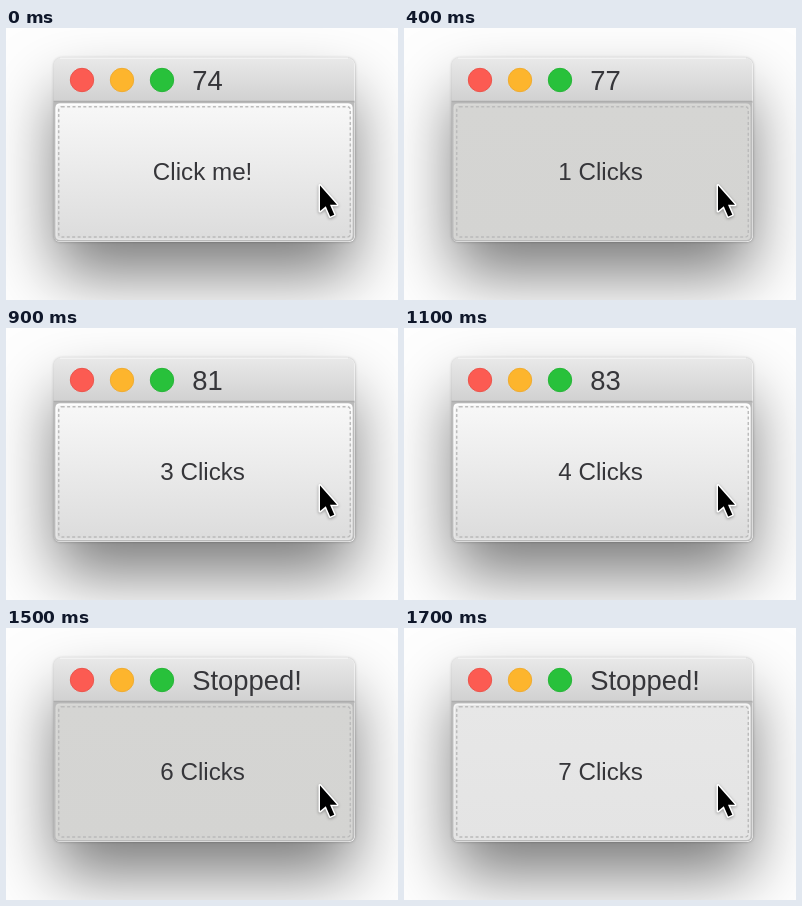
Write an HTML page that moves like this. It is 392 px wide and 272 px high and loops after 1800 ms.

```html
<!DOCTYPE html>
<html lang="en">
<head>
<meta charset="utf-8">
<title>Click counter</title>
<style>
  html, body { margin: 0; width: 392px; height: 272px; overflow: hidden; background: #fefefe; }
  #shadow {
    position: absolute; left: 47.5px; top: 29.5px; width: 301px; height: 184px;
    border-radius: 8px 8px 6px 6px;
    box-shadow: 0 34px 64px -2px rgba(0, 0, 0, .52), 0 0 3px rgba(0, 0, 0, .3);
  }
  svg { position: absolute; left: 0; top: 0; display: block; }
  text { font-family: "Liberation Sans", Arial, sans-serif; fill: #36363a; }
  #cursor { filter: drop-shadow(0 1.5px 1.5px rgba(0, 0, 0, .35)); }
</style>
</head>
<body>
<div id="shadow"></div>
<svg width="392" height="272" viewBox="0 0 392 272">
  <defs>
    <linearGradient id="bar" x1="0" y1="0" x2="0" y2="1">
      <stop offset="0" stop-color="#e9e9e9"/>
      <stop offset="1" stop-color="#d0d0d0"/>
    </linearGradient>
    <linearGradient id="face" x1="0" y1="0" x2="0" y2="1">
      <stop id="top" offset="0"/>
      <stop id="bottom" offset="1"/>
    </linearGradient>
    <linearGradient id="edge" x1="0" y1="0" x2="0" y2="1">
      <stop offset="0" stop-color="#fff"/>
      <stop offset="1" stop-color="#e6e6e6"/>
    </linearGradient>
  </defs>

  <path d="M47.5 75V37.5a8 8 0 0 1 8-8H340.5a8 8 0 0 1 8 8V75Z" fill="url(#bar)"/>
  <path d="M54 30.3H342" stroke="#f2f2f2" stroke-width="1.4"/>
  <path d="M47.5 74H348.5V207.5a6 6 0 0 1-6 6H53.5a6 6 0 0 1-6-6Z" fill="#bababa"/>
  <path d="M47.5 73.5H348.5" stroke="#adadad" stroke-width="1.6"/>

  <g stroke-width="1">
    <circle cx="76" cy="52" r="11.7" fill="#fc5b52" stroke="#ec554c"/>
    <circle cx="116" cy="52" r="11.7" fill="#fdb52d" stroke="#f0ac30"/>
    <circle cx="156" cy="52" r="11.7" fill="#28c13b" stroke="#27b638"/>
  </g>
  <text id="title" x="186.2" y="62" font-size="27.4"></text>

  <rect x="49.5" y="75.5" width="297" height="136.5" rx="4" fill="url(#face)"/>
  <rect id="rim" x="50.3" y="76.3" width="295.4" height="134.9" rx="4" fill="none" stroke="url(#edge)" stroke-width="1.5"/>
  <rect x="52.7" y="78.7" width="291.6" height="130.3" rx="3" fill="none" stroke="#bbb" stroke-width="1.5" stroke-dasharray="3 2.4"/>
  <text id="label" x="196.6" y="152" font-size="24.2" text-anchor="middle"></text>

  <path id="cursor" d="M314 157.5V183L319.8 178.3L324.2 188.5L328.3 186.7L324 176.8H331Z"
        fill="#000" stroke="#fff" stroke-width="3" stroke-linejoin="round" paint-order="stroke"/>
</svg>
<script>
  const LOOP = 1800, TICK = 125, STOP = 1300;
  const get = id => document.getElementById(id);

  // Gradient top, gradient bottom, rim opacity
  const FACES = {
    idle:    ["#f8f8f8", "#dcdcdc", .9],
    armed:   ["#f1f1f1", "#dcdcdc", .8],
    release: ["#e7e7e7", "#e4e4e4", .6],
    pressed: ["#d5d5d3", "#d4d4d2", .1]
  };

  // Start time, clicks so far, button look
  const STEPS = [
    [0, 0, "idle"], [300, 0, "armed"],
    [400, 1, "pressed"], [500, 1, "idle"],
    [600, 2, "release"], [700, 2, "idle"],
    [800, 3, "pressed"], [900, 3, "idle"],
    [1000, 4, "pressed"], [1100, 4, "idle"],
    [1300, 5, "pressed"], [1400, 5, "idle"],
    [1500, 6, "pressed"], [1600, 6, "idle"],
    [1700, 7, "release"]
  ];

  let shown = "";

  function draw(now) {
    const t = Math.floor((now % LOOP) / 100 + .001) * 100;
    const [, clicks, look] = STEPS.filter(s => s[0] <= t).pop();
    const title = t >= STOP ? "Stopped!" : String(74 + Math.floor((t + 35) / TICK));
    const key = title + clicks + look;
    if (key !== shown) {
      shown = key;
      const [top, bottom, rim] = FACES[look];
      get("title").textContent = title;
      get("label").textContent = clicks ? clicks + " Clicks" : "Click me!";
      get("top").setAttribute("stop-color", top);
      get("bottom").setAttribute("stop-color", bottom);
      get("rim").setAttribute("stroke-opacity", rim);
    }
  }

  const start = performance.now();
  function frame() {
    draw(performance.now() - start);
    requestAnimationFrame(frame);
  }
  frame();
</script>
</body>
</html>
```
